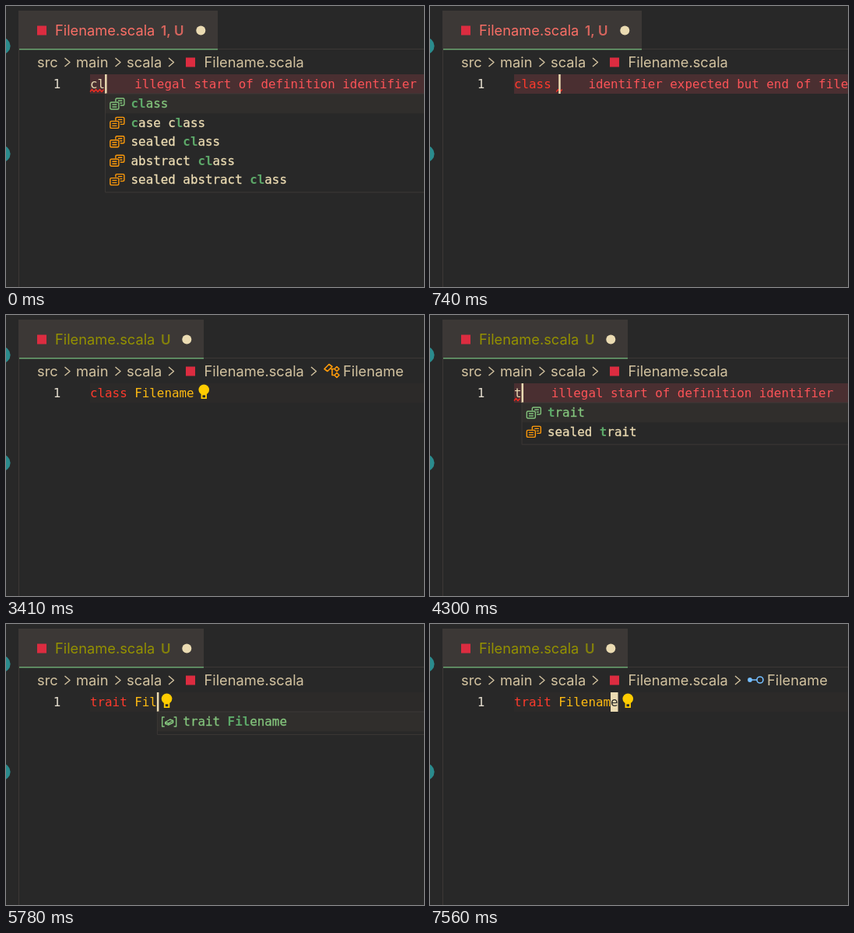
An HTML page with a canvas for the animation above (8000 ms loop, 537 px wide and 362 px high).

```html
<!DOCTYPE html>
<html lang="en">
<head>
<meta charset="utf-8">
<title>Editor completion</title>
<style>
  html, body { margin: 0; width: 100%; height: 100%; overflow: hidden; background: #282828; }
  canvas { display: block; }
</style>
</head>
<body>
<canvas id="stage"></canvas>
<script>
const WIDTH = 537, HEIGHT = 362, LOOP = 8000;
const CODE_X = 108, CHAR = 9.54, ROW_TOP = 88, ROW_H = 25, ITEM_H = 24.4;
const MONO = '15.85px "DejaVu Sans Mono", monospace';
const UI = '18.25px Inter, sans-serif';
const STATUS = '600 17px Inter, sans-serif';
const C = {
  bg: '#282828', line: '#3c3836', row: '#2c2a29', selected: '#302e2c', errorRow: '#4a2f31',
  fg: '#ebdbb2', number: '#e6dfd0', crumb: '#d3c3a0', keyword: '#ff3a2c', type: '#ffbb12',
  error: '#fc5357', tabError: '#f96f66', tabOk: '#949100', tabLine: '#6ca672',
  green: '#83c47c', match: '#5ca768', orange: '#ff9a0a', blue: '#75beff',
  bulb: '#ffcc00', logo: '#dc2c40', teal: '#2a8b8d'
};

const ILLEGAL = 'illegal start of definition identifier';
const EXPECTED = 'identifier expected but end of file found';
const CLASSES = ['class', 'case class', 'sealed class', 'abstract class', 'sealed abstract class'];
const TRAITS = ['trait', 'sealed trait'];

// Each step lists only what changes from the previous one.
const steps = [
  [0, { text: 'cl', caret: 'bar', error: ILLEGAL, list: CLASSES, problem: true, symbol: null, bulb: false }],
  [150, { text: 'cla' }],
  [300, { text: 'clas' }],
  [440, { text: 'class' }],
  [590, { text: 'class ', list: null }],
  [740, { error: EXPECTED }],
  [1040, { text: 'class F' }],
  [1190, { list: ['class Filename'] }],
  [1330, { error: null, problem: false }],
  [1480, { caret: null, bulb: true, symbol: ['class', 'F'] }],
  [2070, { text: 'class Filename', list: null, caret: 'bar', bulb: false }],
  [2370, { bulb: true }],
  [2520, { caret: null, symbol: ['class', 'Filename'] }],
  [2960, { caret: 'block' }],
  [3410, { caret: null }],
  [3560, { text: '', caret: 'block', bulb: false }],
  [3850, { caret: 'bar', symbol: null }],
  [4300, { text: 't', error: ILLEGAL, list: TRAITS }],
  [4450, { text: 'tr', problem: true }],
  [4600, { text: 'tra' }],
  [4740, { text: 'trait' }],
  [4890, { text: 'trait ', error: EXPECTED, list: null }],
  [5330, { text: 'trait F', list: ['trait Filename'] }],
  [5480, { text: 'trait Fil', error: null, problem: false }],
  [5780, { bulb: true }],
  [5930, { symbol: ['trait', 'Fil'] }],
  [6070, { text: 'trait Filename', list: null, bulb: false }],
  [6220, { bulb: true }],
  [6520, { caret: null, symbol: ['trait', 'Filename'] }],
  [6670, { caret: 'block' }],
  [7120, { caret: null }],
  [7560, { caret: 'block' }]
];

const canvas = document.getElementById('stage');
const ctx = canvas.getContext('2d');
const ratio = window.devicePixelRatio || 1;
canvas.width = WIDTH * ratio;
canvas.height = HEIGHT * ratio;
canvas.style.width = WIDTH + 'px';
canvas.style.height = HEIGHT + 'px';

function rect(x, y, w, h, color) {
  ctx.fillStyle = color;
  ctx.fillRect(x, y, w, h);
}

function disc(x, y, r, color) {
  ctx.fillStyle = color;
  ctx.beginPath();
  ctx.arc(x, y, r, 0, 2 * Math.PI);
  ctx.fill();
}

function text(str, x, y, color, font, thicken = 0) {
  ctx.font = font;
  ctx.fillStyle = ctx.strokeStyle = color;
  ctx.fillText(str, x, y);
  if (!thicken) return;
  ctx.lineWidth = thicken;
  ctx.strokeText(str, x, y);
}

function stroke(path, x, y, color, width = 1.4) {
  ctx.save();
  ctx.translate(x, y);
  ctx.strokeStyle = color;
  ctx.lineWidth = width;
  ctx.lineJoin = 'round';
  ctx.stroke(new Path2D(path));
  ctx.restore();
}

const icons = {
  keyword(x, y, color) {
    stroke('M8 5V2.5Q8 1 9.5 1H17.5Q19 1 19 2.5V8.5Q19 10 17.5 10H14 ' +
      'M2.5 6H10.5Q12 6 12 7.5V13.5Q12 15 10.5 15H2.5Q1 15 1 13.5V7.5Q1 6 2.5 6Z ' +
      'M11 4H16.5 M13.5 7H16.5 M3.5 9H9.5 M3.5 12H9.5', x, y, color);
  },
  interface(x, y, color) {
    stroke('M4 2H1V14H4 M16 2H19V14H16 M5 8.5L11 5L15 6.5V9L9 12L5 10.5Z M5 8.5L9 9.8L15 6.5 M9 9.8V12', x, y, color);
  },
  class(x, y, color) {
    stroke('M1 8L7 2L11 5L5 11Z M9 8H14 M11 8V16H14 M14 8L17 5L20 8L17 11Z M14 16L17 13L20 16L17 19Z', x, y - 10.5, color, 1.6);
  },
  trait(x, y, color) {
    disc(x + 3, y, 2.9, color);
    stroke('M5 0H12 M20 0A4 4 0 1 1 12 0A4 4 0 1 1 20 0', x, y, color, 1.6);
  }
};

function chevron(x) {
  stroke('M0 -5.5L6.5 0L0 5.5', x, 72.5, C.crumb);
}

function drawTab({ problem }) {
  const width = problem ? 256 : 238;
  const color = problem ? C.tabError : C.tabOk;
  rect(16, 55, WIDTH - 16, 1, C.line);
  rect(16, 6, width, 49.5, C.line);
  rect(17, 55, width - 1, 1.5, C.tabLine);
  rect(40, 25.5, 12, 12, C.logo);
  text('Filename.scala', 63, 38, color, UI);
  ctx.globalAlpha = 0.82;
  text(problem ? '1, U' : 'U', 199, 38, color, STATUS);
  ctx.globalAlpha = 1;
  disc(problem ? 250.3 : 232.3, 31.5, 6, C.fg);
}

function drawBreadcrumb({ symbol }) {
  [['src', 40], ['main', 90], ['scala', 155], ['Filename.scala', 254.5]]
    .forEach(([name, x]) => text(name, x, 79, C.crumb, UI));
  [75.5, 140.5, 209].forEach(chevron);
  rect(231, 66.5, 12, 12, C.logo);
  if (!symbol) return;
  const [kind, name] = symbol;
  chevron(392);
  icons[kind](408, 72, kind === 'class' ? C.orange : C.blue);
  text(name, 433, 79, C.crumb, UI);
}

function squiggle(from, to) {
  let path = `M${from} 110.5`;
  for (let x = from + 2.5, up = true; x <= to; x += 2.5, up = !up) path += `L${x} ${up ? 107.5 : 110.5}`;
  stroke(path, 0, 0, '#f32a20', 1.3);
}

function drawBulb(x) {
  disc(x, 96.2, 6.8, C.bulb);
  rect(x - 3.7, 99, 7.4, 9, C.bulb);
  rect(x - 1.8, 103.3, 3.6, 3, C.bg);
}

function drawCode({ text: code, error, caret, bulb }) {
  const end = CODE_X + code.length * CHAR;
  const baseline = 105.7;
  rect(CODE_X, ROW_TOP, WIDTH - CODE_X, ROW_H, error ? C.errorRow : C.row);
  text('1', 60.7, baseline, C.number, MONO);

  const keyword = /^(class|trait)\b/.test(code) ? 5 : 0;
  text(code.slice(0, keyword), CODE_X, baseline, C.keyword, MONO);
  text(code.slice(keyword), CODE_X + keyword * CHAR, baseline, keyword ? C.type : C.fg, MONO);

  if (error) {
    if (keyword) squiggle(end - 3, end + 6);
    else squiggle(CODE_X, end);
    text(error, end + 4 * CHAR, baseline, C.error, MONO);
  }
  if (caret === 'bar') rect(end, ROW_TOP, 2.5, ROW_H, C.fg);
  if (caret === 'block') {
    const x = Math.max(CODE_X, end - CHAR);
    rect(x, ROW_TOP, CHAR, ROW_H, C.fg);
    text(code.slice(-1), x, baseline, C.bg, MONO);
  }
  if (bulb) drawBulb(end + 12.7);
}

// Index of every label character that the typed word matches.
function matches(label, word) {
  const start = (' ' + label).lastIndexOf(' ' + word);
  const found = [...word].map((_, i) => start + i);
  if (label.startsWith(word[0])) found[0] = 0;
  return found;
}

function drawList({ text: code, list }) {
  if (!list) return;
  const x = CODE_X + code.length * CHAR + 0.5;
  const word = code.split(' ').pop();
  const bottom = 118 + list.length * ITEM_H;
  rect(x, 113, WIDTH - x, bottom - 113, C.bg);
  rect(x, 113, WIDTH - x, 25.4, C.selected);
  stroke(`M${WIDTH + 2} 113H${x}V${bottom}H${WIDTH + 2}`, 0, 0, C.line, 1);

  list.forEach((label, row) => {
    const color = row ? C.fg : C.green;
    const top = 118 + row * ITEM_H;
    const icon = label === 'trait Filename' ? 'interface' : 'keyword';
    icons[icon](x + 5.3, top, row ? C.orange : C.green);
    const hits = matches(label, word);
    [...label].forEach((char, i) => {
      const hit = hits.includes(i);
      const font = (hit ? 'bold ' : '') + MONO;
      text(char, x + 33 + i * CHAR, top + 13.4, hit ? C.match : color, font, hit ? 0 : 0.3);
    });
  });
}

function draw(time) {
  const state = Object.assign({}, ...steps.filter(([at]) => at <= time).map(([, change]) => change));
  ctx.setTransform(ratio, 0, 0, ratio, 0, 0);
  rect(0, 0, WIDTH, HEIGHT, C.bg);
  disc(-5, 51.5, 10.6, C.teal);
  disc(-5, 190.5, 10.6, C.teal);
  rect(16, 6, 1, HEIGHT - 6, C.line);
  drawTab(state);
  drawBreadcrumb(state);
  drawCode(state);
  drawList(state);
}

const begin = performance.now();
function tick() {
  draw((performance.now() - begin) % LOOP);
  requestAnimationFrame(tick);
}
tick();
</script>
</body>
</html>
```
